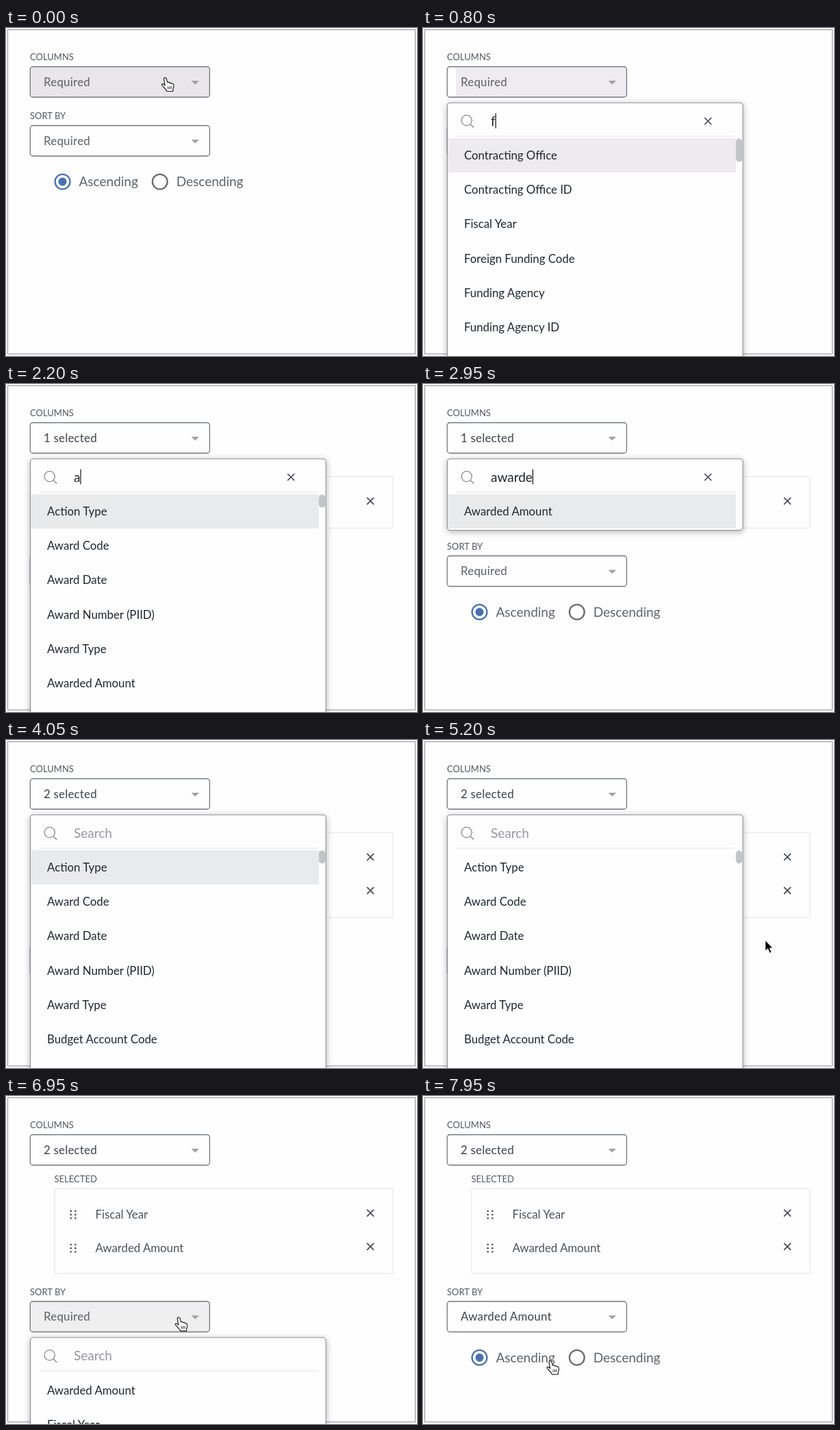
Animation, 600 px wide and 479 px high, one loop 8 s. Source, as an HTML page:

```html
<!DOCTYPE html>
<html lang="en">
<head>
<meta charset="utf-8">
<title>Column picker</title>
<style>
html, body { margin: 0; width: 100%; height: 100%; overflow: hidden; background: #fff; }
svg { display: block; width: 600px; height: 479px; font-family: Lato, "Open Sans", sans-serif; }
</style>
</head>
<body>
<svg viewBox="0 0 600 479" xmlns="http://www.w3.org/2000/svg">
  <defs>
    <filter id="shadow" x="-10%" y="-20%" width="120%" height="140%">
      <feDropShadow dx="0" dy="2" stdDeviation="5" flood-color="#000" flood-opacity=".3"/>
    </filter>
  </defs>
  <rect width="600" height="479" fill="#fefefe"/>
  <rect x="2.5" y="2.5" width="595" height="473.5" fill="none" stroke="#9c9da5" stroke-width="1.2"/>
  <g id="scene"></g>
</svg>
<script>
const LOOP = 8000;
const ROW = 50.2;
const scene = document.getElementById('scene');
const pen = document.createElement('canvas').getContext('2d');

const columns = ['Action Type', 'Award Code', 'Award Date', 'Award Number (PIID)', 'Award Type',
  'Awarded Amount', 'Budget Account Code', 'Contracting Office', 'Contracting Office ID',
  'Fiscal Year', 'Foreign Funding Code', 'Funding Agency', 'Funding Agency ID',
  'Funding Office', 'Funding Office ID', 'Prior Award Code', 'Prior Award Date'];

// Moments of the interaction, in ms
const OPEN = 450, PICK1 = 1900, PICK2 = 4050, CLOSE = 5300;
const SORT_OPEN = 6200, SORT_PICK = 7350;
const HIDE = 700, SHOW = 4450;

const typing = [
  { word: 'fiscal', at: [750, 850, 1000, 1100, 1300, 1350], end: PICK1 },
  { word: 'awarded a', at: [2150, 2650, 2700, 2750, 2900, 2950, 3000, 3550, 3650], end: PICK2 }
];

// Pointer moves: start, end, control point, target
const moves = [
  { from: 4500, to: 5150, c: [360, 640], p: [499.5, 292] },
  { from: 5400, to: 6000, c: [380, 290], p: [254, 305] },
  { from: 6850, to: 7200, c: [250, 360], p: [228, 425] },
  { from: 7500, to: 7900, c: [205, 420], p: [186, 387] }
];

const ease = k => k < .5 ? 2 * k * k : 1 - 2 * (1 - k) * (1 - k);

function pointerAt(t) {
  let pos = [232.5, 73];
  for (const m of moves) {
    if (t < m.from) break;
    const k = ease(Math.min(1, (t - m.from) / (m.to - m.from)));
    pos = pos.map((a, i) => (1 - k) * (1 - k) * a + 2 * k * (1 - k) * m.c[i] + k * k * m.p[i]);
  }
  return pos;
}

function queryAt(t) {
  for (const { word, at, end } of typing) {
    if (t >= at[0] && t < end) return word.slice(0, at.filter(a => a <= t).length);
  }
  return '';
}

const text = (x, y, s, size, fill, extra = '') =>
  `<text x="${x}" y="${y}" font-size="${size}" fill="${fill}" ${extra}>${s}</text>`;
const rect = (x, y, w, h, fill, extra = '') =>
  `<rect x="${x}" y="${y}" width="${w}" height="${h}" fill="${fill}" ${extra}/>`;
const path = (d, stroke, width, extra = '') =>
  `<path d="${d}" fill="none" stroke="${stroke}" stroke-width="${width}" ${extra}/>`;
const label = (x, y, s) => text(x, y, s, 13, '#555961');
const cross = (x, y) => path(`M${x - 5} ${y - 5}l10 10m0-10l-10 10`, '#474c55', 1.7);
const inside = ([px, py], x, y, w, h) => px >= x && px <= x + w && py >= y && py <= y + h;

function field(y, value, shade = '', shadeX = 35.5) {
  return rect(35.3, y + .5, 262, 44.5, '#fefefe', 'rx="4"') +
    (shade && rect(shadeX, y + .5, 297 - shadeX, 44.5, shade, 'rx="4"')) +
    rect(35.3, y + .5, 262, 44.5, 'none', 'rx="4" stroke="#74777d" stroke-width="1.3"') +
    text(55, y + 28.5, value, 16.8, value === 'Required' ? '#66696e' : '#4b4f55',
      'font-weight="500" letter-spacing=".25"') +
    `<path d="M270.5 ${y + 21}h11.5l-5.75 5.5z" fill="#a0a1a6"/>`;
}

function radio(x, y, name, on) {
  const color = on ? '#4a70b0' : '#696b70';
  return `<circle cx="${x}" cy="${y}" r="10.9" fill="none" stroke="${color}" stroke-width="2.3"/>` +
    (on ? `<circle cx="${x}" cy="${y}" r="6" fill="${color}"/>` : '') +
    text(x + 24, y + 6.8, name, 19, '#5f6368');
}

function picked(names) {
  if (!names.length) return '';
  let out = label(70.5, 126, 'SELECTED') +
    rect(71, 135.5, 494, 26 + 48.8 * names.length, 'none', 'stroke="#e3e4e9"');
  names.forEach((name, i) => {
    const y = 173 + 49 * i;
    for (let d = 0; d < 6; d++) {
      out += `<circle cx="${94.7 + d % 2 * 6.6}" cy="${y - 5 + (d >> 1) * 5.2}" r="1.25" fill="#3f444b"/>`;
    }
    out += text(130.5, y + 6, name, 16.8, '#4c525a') + cross(532, y - 2.2);
  });
  return out;
}

function dropdown(top, items, query, active, thumb, tint) {
  const h = Math.min(54 + ROW * items.length, 520 - top);
  let out = rect(35.6, top + .3, 431.4, h, '#fefefe',
    'rx="4" stroke="#8c8f96" stroke-width="1.1" filter="url(#shadow)"');
  out += `<circle cx="63.7" cy="${top + 26}" r="7.6" fill="none" stroke="#8a8d92" stroke-width="1.4"/>` +
    path(`M69.2 ${top + 31.5}l5 5`, '#8a8d92', 1.4) +
    path(`M48 ${top + 49}H455`, '#e2e3e7', 1);
  if (query) {
    pen.font = '19px Lato, "Open Sans", sans-serif';
    const x = 99.5 + pen.measureText(query).width;
    out += text(99, top + 33.5, query, 19, '#20262d') +
      path(`M${x} ${top + 15.5}v22`, '#111', 1.2) + cross(416, top + 27);
  } else {
    out += text(99, top + 33.5, 'Search', 19, '#97989d');
  }
  items.slice(0, 7).forEach((name, i) => {
    const y = top + 52 + ROW * i;
    if (i === active) out += rect(36.3, y, 420.5, 50, tint);
    out += text(60, y + 31, name, 16.8, '#1f2730');
  });
  if (thumb) out += rect(456.7, top + 52.5, 9.6, thumb, '#c3c4c8', 'rx="4.8"');
  return out;
}

function cursor([x, y], hand) {
  const at = `transform="translate(${x} ${y})" stroke-linejoin="round"`;
  if (!hand) {
    return `<path ${at} d="M0 0V16.6L3.8 13L6.6 19.4L9.5 18.1L6.8 12H11.8Z" fill="#000" stroke="#fff" stroke-width="1.1"/>`;
  }
  return `<g ${at} stroke="#222" stroke-width="1.2"><path fill="#fff" d="M-2 1.5C-2.3-.6 1-1 1.7 1
    L3.4 6.6C4.2 5.8 6 6 6.4 7.4C7.2 6.6 9 7 9.3 8.4C10.4 7.8 12 8.6 12.2 10C12.8 12.5 12.6 14 11.4 16.2
    L11.2 19.5H2.4C1.6 17-.5 15.5-2.6 13C-4 11.2-5.6 10.6-5 9.2C-4.2 8-2 9-.4 10.8Z"/>
    <path fill="none" stroke-width="1" d="M3.9 12.5l.3 4M6.4 12.3l.2 4M8.8 12.2v4"/></g>`;
}

function draw(t) {
  const names = ['Fiscal Year', 'Awarded Amount'].slice(0, (t >= PICK1) + (t >= PICK2));
  const shift = [0, 108.5, 157.5][names.length];
  const sortY = 142 + shift;
  const radioY = 224.5 + shift;
  const open = t >= OPEN && t < CLOSE;
  const sorting = t >= SORT_OPEN && t < SORT_PICK;
  const tip = pointerAt(t);
  const visible = t < HIDE || t >= SHOW;
  const overList = top => inside(tip, 36, top, 431, 480);
  const hovered = top => overList(top) ? Math.floor((tip[1] - top - 52) / ROW) : -1;
  const overSort = !open && inside(tip, 35, sortY, 262, 45);

  let shade = '';
  if (t < HIDE) shade = '#e8e6e8';
  else if (t < 1650) shade = '#eeecee';

  let out = label(35, 47.3, 'COLUMNS') +
    field(56, names.length ? names.length + ' selected' : 'Required', shade, t < HIDE ? 35.5 : 48) +
    picked(names) +
    label(35, 133.4 + shift, 'SORT BY') +
    field(sortY, t >= SORT_PICK ? 'Awarded Amount' : 'Required', overSort ? '#efeff0' : '') +
    radio(82.5, radioY, 'Ascending', true) +
    radio(224.7, radioY, 'Descending', false);

  if (open) {
    const query = queryAt(t);
    const items = columns.filter(c => !names.includes(c) && c.toLowerCase().includes(query));
    const byKey = t >= HIDE && t < SHOW + 100;
    const thumb = items.length < 6 ? 0 : query[0] === 'f' ? 34 : 19;
    out += dropdown(109, items, query, byKey ? 0 : hovered(109), thumb, t < PICK1 ? '#edebee' : '#e9eaec');
  }
  if (sorting) {
    const top = sortY + 53;
    out += dropdown(top, ['Awarded Amount', 'Fiscal Year'], '', hovered(top), 0, '#e9eaec');
  }
  if (visible) {
    const hand = inside(tip, 35, 56, 262, 45) || overSort || (open && overList(109)) ||
      (sorting && overList(sortY)) || (!open && inside(tip, 70, radioY - 14, 277, 28));
    out += cursor(tip, hand);
  }
  scene.innerHTML = out;
}

const start = performance.now();
function tick() {
  draw((performance.now() - start) % LOOP);
  requestAnimationFrame(tick);
}
tick();
</script>
</body>
</html>
```
